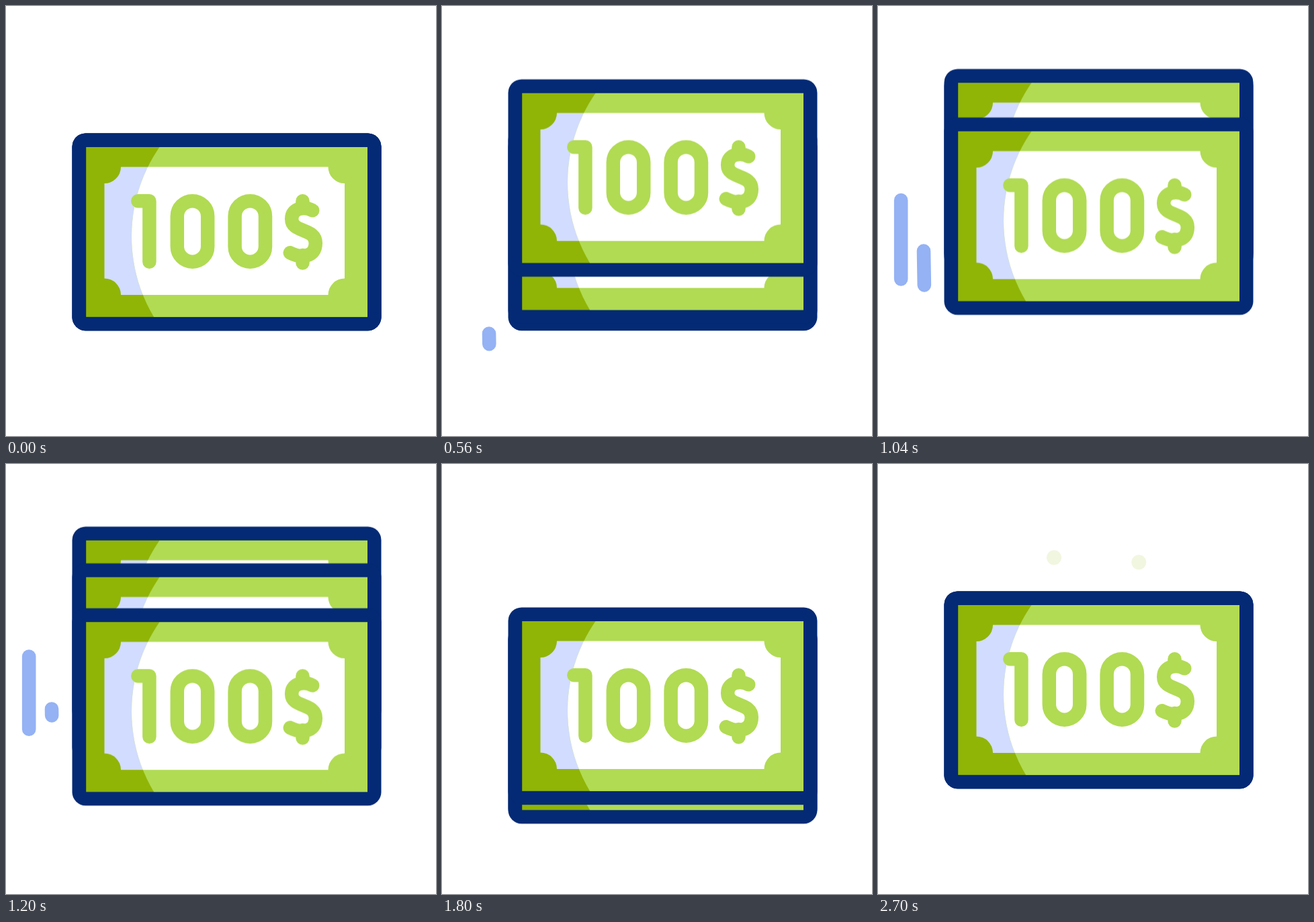
These frames come from a looping animation (640x640 px, 3080 ms). An HTML page:

```html
<!DOCTYPE html>
<html lang="en">
<head>
<meta charset="utf-8">
<title>Banknotes</title>
<style>
  @property --from { syntax: "<number>"; inherits: false; initial-value: 0; }
  @property --to { syntax: "<number>"; inherits: false; initial-value: 0; }

  html, body { margin: 0; width: 100%; height: 100%; overflow: hidden; background: #fff; }
  svg { display: block; width: 100%; height: 100%; }

  .note, .streak, .dot {
    animation-duration: 3080ms;
    animation-iteration-count: infinite;
    animation-timing-function: ease;
  }

  /* notes toss up, drop past the rest position and settle, one after another */
  .note { animation-name: toss; }
  .second { animation-delay: 200ms; }
  .third { animation-delay: 400ms; }
  @keyframes toss {
    0%, 10.065% { transform: translateY(0); }
    25.325%, 27.11% { transform: translateY(-96.3px); }
    50.487%, 50.974% { transform: translateY(53.6px); }
    74.351%, 100% { transform: translateY(0); }
  }

  /* speed streaks: head grows first, tail catches up */
  .streak {
    fill: none;
    stroke: #94b2f4;
    stroke-width: 20.6;
    stroke-linecap: round;
    stroke-dasharray: calc((var(--to) - var(--from)) * 1px) 999px;
    stroke-dashoffset: calc(var(--from) * -1px);
    animation-timing-function: ease, ease, step-end;
  }
  .near { animation-name: near-head, near-tail, near-show; }
  .far { animation-name: far-head, far-tail, far-show; }
  @keyframes near-head { 0%, 16.169% { --to: 0; } 34.545%, 100% { --to: 138.7; } }
  @keyframes near-tail { 0%, 27.597% { --from: 0; } 44.481%, 100% { --from: 138.7; } }
  @keyframes near-show { 0% { opacity: 0; } 16.169% { opacity: 1; } 44.4%, 100% { opacity: 0; } }
  @keyframes far-head { 0%, 24.87% { --to: 0; } 35.909%, 100% { --to: 120; } }
  @keyframes far-tail { 0%, 37.338% { --from: 0; } 53.571%, 100% { --from: 120; } }
  @keyframes far-show { 0% { opacity: 0; } 24.87% { opacity: 1; } 53.5%, 100% { opacity: 0; } }

  /* dots pop out from behind the stack and fade */
  .dot { fill: #90b506; animation-name: pop, fade; animation-timing-function: ease, linear; }
  @keyframes pop {
    0%, 73.701% { transform: translateY(66px); }
    80.519% { transform: translateY(-13px); animation-timing-function: ease-in-out; }
    87.662%, 100% { transform: translateY(0); }
  }
  @keyframes fade {
    0%, 73.7% { opacity: 0; }
    73.701%, 80.519% { opacity: 1; }
    87.662%, 100% { opacity: .12; }
  }
</style>
</head>
<body>
<svg viewBox="0 0 640 640">
  <defs>
    <clipPath id="lit"><circle cx="421" cy="343" r="234"/></clipPath>
    <path id="panel" d="M171 239.5H479.5A24.5 24.5 0 0 0 504 264V405.5A24.5 24.5 0 0 0 479.5 430H171A24.5 24.5 0 0 0 146.5 405.5V264A24.5 24.5 0 0 0 171 239.5Z"/>
    <g id="note">
      <rect x="98.5" y="189.4" width="460" height="293.8" rx="20" fill="#042a75"/>
      <rect x="119.2" y="210" width="418.8" height="252.8" fill="#90b506"/>
      <use href="#panel" fill="#d2dcfe"/>
      <g clip-path="url(#lit)">
        <rect x="119.2" y="210" width="418.8" height="252.8" fill="#b1db53"/>
        <use href="#panel" fill="#fff"/>
      </g>
      <g fill="none" stroke="#b1db53" stroke-width="20.5" stroke-linecap="round" stroke-linejoin="round">
        <path d="M196.3 290.2H213.4V380.7"/>
        <rect x="254.8" y="290.2" width="45.4" height="90.5" rx="22.7"/>
        <rect x="340.6" y="290.2" width="45.4" height="90.5" rx="22.7"/>
        <path d="M456.3 304.3C446 299 425.2 299 425.2 317C425.2 338 460.8 330 460.8 353C460.8 375 438 375 422.8 367.3M441.5 290.2V300M441.5 371V382.5"/>
      </g>
    </g>
  </defs>

  <path class="streak near" d="M70.3 503.2L68 364.5"/>
  <path class="streak far" d="M34.2 406.5V286.5"/>
  <circle class="dot" cx="262" cy="139.3" r="11"/>
  <circle class="dot" cx="388.2" cy="146.3" r="11"/>
  <use class="note third" href="#note"/>
  <use class="note second" href="#note"/>
  <use class="note" href="#note"/>
</svg>
</body>
</html>
```
